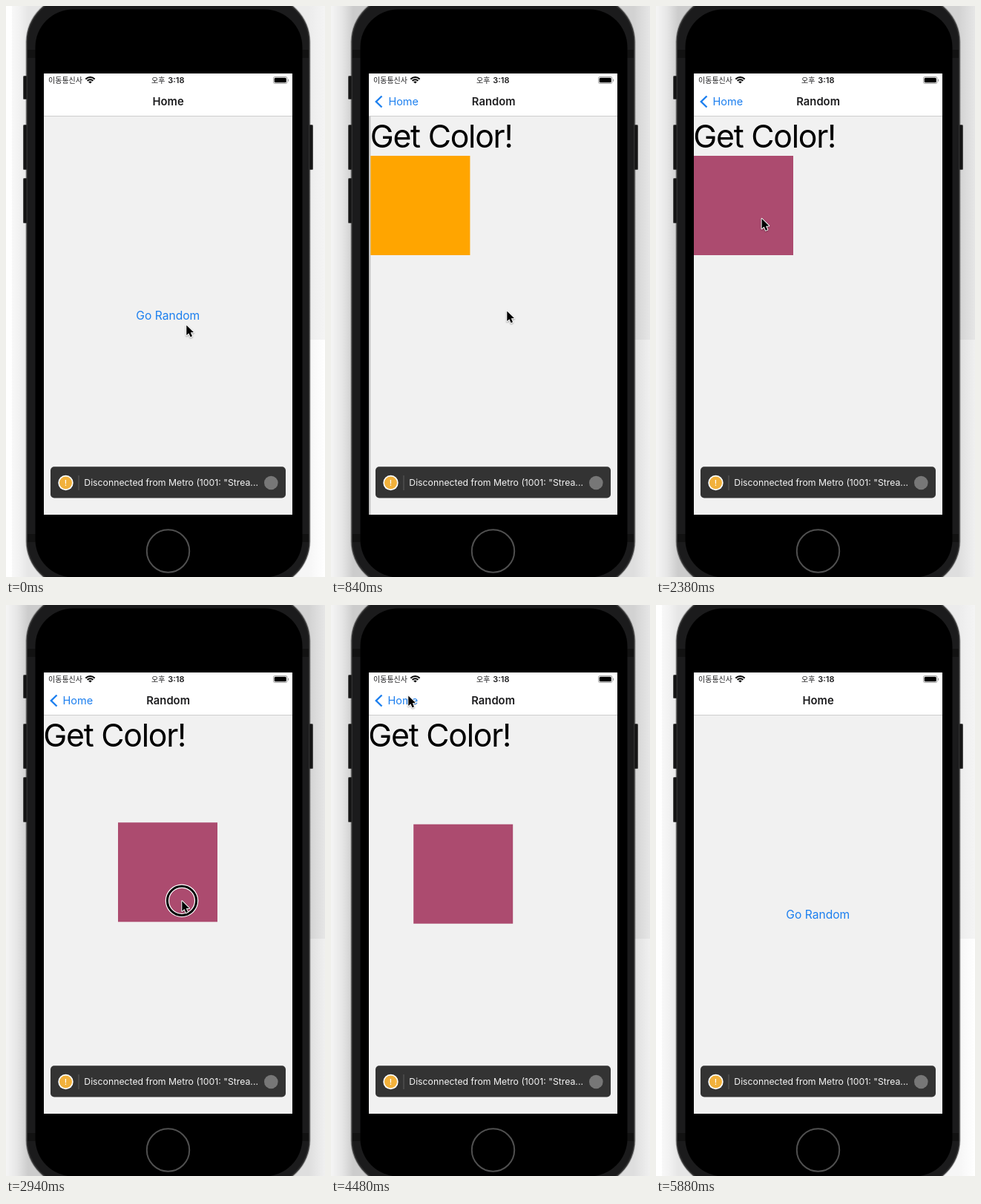
Recreate the animation shown at these times as an HTML page with a canvas. Size 430 by 770 pixels, loop 6.58 s.

```html
<!DOCTYPE html>
<html lang="ko">
<head>
<meta charset="utf-8">
<title>Random color demo</title>
<style>
html, body { margin: 0; width: 100%; height: 100%; overflow: hidden; background: #fff; }
canvas { display: block; width: 430px; height: 770px; }
</style>
</head>
<body>
<canvas id="stage"></canvas>
<script>
const canvas = document.getElementById('stage');
const ctx = canvas.getContext('2d');
const dpr = window.devicePixelRatio || 1;
canvas.width = 430 * dpr;
canvas.height = 770 * dpr;

const LOOP = 6580, STEP = 70;
const SCREEN = { x: 51, y: 91, w: 335, h: 595 };
const BODY = { y: 149, h: 537 };
const BLUE = '#1c7fef', INK = '#1c1c1e', PAGE = '#f1f1f1';
const SANS = 'Inter, "Noto Sans", sans-serif';
const HANGUL = '"Noto Sans CJK KR", "Noto Sans CJK", sans-serif';

const PUSH = 456, POP = 4780;
const TAP = 140;
const OPEN = 350, BACK = 4690;
const boxTaps = [1540, 1750, 2030];
const colors = ['#ffa500', '#f91c94', '#8a63b8', '#ac4b6f'];
const HOLD = { from: 2590, to: 3920 };
const DRAG = { from: 2730, to: 3710, grab: [86, 105.5] };

// Pointer moves: start, end, x, y
const start = [243, 430];
const moves = [
  [0, 350, 237, 411],
  [840, 1470, 187, 157],
  [2100, 2450, 140, 293],
  [3640, 3710, 198, 382],
  [3850, 4480, 104, 122],
  [4830, 5390, 230, 800]
];
// Dragged square: time, x, y
const dragKeys = [
  [2660, 51, 202], [2940, 151, 293.3], [3220, 231, 347],
  [3360, 223.3, 346.2], [3570, 120, 372], [3710, 111.2, 295.7]
];

const clamp = v => Math.max(0, Math.min(1, v));
const mix = (a, b, k) => a + (b - a) * k;
const tapped = (t, at) => t >= at && t < at + TAP;

function pointerAt(t) {
  let pos = start;
  for (const [from, to, ...target] of moves) {
    const k = Math.sin(clamp((t - from) / (to - from)) * Math.PI / 2);
    pos = pos.map((v, i) => mix(v, target[i], k));
  }
  return pos;
}

// Smooth curve through timed points, at rest at both ends
function spline(keys, t) {
  const last = keys.length - 1;
  if (t <= keys[0][0]) return keys[0].slice(1);
  if (t >= keys[last][0]) return keys[last].slice(1);
  const i = keys.findIndex(k => k[0] > t) - 1;
  const span = keys[i + 1][0] - keys[i][0];
  const k = (t - keys[i][0]) / span;
  const slope = (n, axis) => n === 0 || n === last ? 0 :
    (keys[n + 1][axis] - keys[n - 1][axis]) / (keys[n + 1][0] - keys[n - 1][0]);
  return [1, 2].map(axis =>
    mix(keys[i][axis], keys[i + 1][axis], k * k * (3 - 2 * k)) +
    span * k * (1 - k) * ((1 - k) * slope(i, axis) - k * slope(i + 1, axis)));
}

// Critically damped spring, stiffness 1000 and mass 3
function spring(ms) {
  const s = Math.sqrt(1000 / 3) * Math.max(0, ms) / 1000;
  const p = 1 - Math.exp(-s) * (1 + s);
  return p > 0.9995 ? 1 : p;
}

function rect(x, y, w, h, fill) {
  ctx.fillStyle = fill;
  ctx.fillRect(x, y, w, h);
}

function round(x, y, w, h, r, fill) {
  ctx.beginPath();
  ctx.roundRect(x, y, w, h, r);
  ctx.fillStyle = fill;
  ctx.fill();
}

function disc(x, y, r, fill) {
  ctx.beginPath();
  ctx.arc(x, y, r, 0, Math.PI * 2);
  ctx.fillStyle = fill;
  ctx.fill();
}

function circle(x, y, r, width, color) {
  ctx.beginPath();
  ctx.arc(x, y, r, 0, Math.PI * 2);
  ctx.lineWidth = width;
  ctx.strokeStyle = color;
  ctx.stroke();
}

function text(str, x, y, font, fill, align = 'left', spacing = 0) {
  ctx.font = font;
  ctx.fillStyle = fill;
  ctx.textAlign = align;
  ctx.letterSpacing = spacing + 'px';
  ctx.fillText(str, x, y);
}

function faded(alpha, draw) {
  ctx.save();
  ctx.globalAlpha = clamp(alpha);
  draw();
  ctx.restore();
}

function gradient(x0, x1, ...stops) {
  const g = ctx.createLinearGradient(x0, 0, x1, 0);
  stops.forEach((c, i) => g.addColorStop(i / (stops.length - 1), c));
  return g;
}

function drawBackdrop(active) {
  rect(0, 0, 430, 770, '#fff');
  if (active) {
    rect(0, 0, 60, 770, gradient(0, 30, '#f5f5f5', '#e6e6e6', '#cccccc'));
    rect(380, 0, 50, 450, gradient(408, 430, '#d2d2d2', '#e6e6e6'));
    rect(380, 450, 50, 320, gradient(408, 430, '#dedede', '#f0f0f0'));
  } else {
    rect(8, 0, 52, 770, gradient(8, 30, '#f8f8f8', '#f1f1f1', '#e6e6e6'));
    rect(380, 0, 50, 450, gradient(408, 430, '#ececec', '#f4f4f4'));
    rect(380, 450, 50, 320, gradient(408, 430, '#f6f6f6', '#ffffff'));
  }
}

function sideButton(x, y, h) {
  round(x, y, 6, h, 1.5, '#4a4a4a');
  round(x + 1, y + 1, 4, h - 2, 1, '#161616');
}

function drawPhone() {
  sideButton(23, 94, 32);
  sideButton(23, 160, 61);
  sideButton(23, 232, 61);
  sideButton(408, 160, 61);
  round(26.5, -14.5, 384, 799, 63, 'rgba(0,0,0,.3)');
  round(27.5, -13.5, 382, 797, 62, '#303030');
  round(29, -12, 379, 794, 61, '#1b1b1c');
  for (const y of [59, 712]) rect(29, y, 379, 11, '#121212');
  round(39.5, 4.5, 360, 766, 51, '#000');
  circle(218.5, 735, 28.7, 2, '#505050');
}

function drawStatus() {
  text('이동통신사', 57, 104, '10px ' + HANGUL, INK);
  text('오후', 196, 104, '500 10px ' + HANGUL, INK);
  text('3:18', 240.5, 104, '600 11px ' + SANS, INK, 'right');

  ctx.save();
  ctx.beginPath();
  ctx.moveTo(113.5, 104.5);
  ctx.arc(113.5, 104.5, 12, -Math.PI * 0.76, -Math.PI * 0.24);
  ctx.clip();
  circle(113.5, 104.5, 8.4, 2, '#000');
  circle(113.5, 104.5, 5.2, 2, '#000');
  disc(113.5, 104.5, 3, '#000');
  ctx.restore();

  round(360, 95, 19.5, 10, 3, '#a5a5a5');
  round(360.9, 95.9, 17.7, 8.2, 2.2, '#fff');
  round(361.7, 96.7, 16.1, 6.6, 1.5, '#000');
  round(380, 98.4, 1.2, 3.4, 0.6, '#a5a5a5');
}

function drawHeader(p, t) {
  rect(SCREEN.x, SCREEN.y, SCREEN.w, 57, '#fff');
  rect(SCREEN.x, 148, SCREEN.w, 1, '#cdcdcd');
  drawStatus();

  const title = '600 14.8px ' + SANS;
  const middle = 218.6, travel = 122;
  faded(1 - 2 * p, () => text('Home', middle - travel * p, 134, title, INK, 'center'));
  faded(p * p, () => text('Random', middle + SCREEN.w / 4 * (1 - p), 134, title, INK, 'center'));

  faded((p - 0.3) / 0.7 * (tapped(t, BACK) ? 0.3 : 1), () => {
    ctx.lineWidth = 2.4;
    ctx.strokeStyle = BLUE;
    ctx.stroke(new Path2D('M68.5 121.5L60.8 129L68.5 136.5'));
    text('Home', 76.5 + travel * (1 - p), 134, '14.5px ' + SANS, BLUE);
  });
}

function drawHome(p, t) {
  faded(tapped(t, OPEN) ? 0.3 : 1, () =>
    text('Go Random', 218.3 - 0.3 * SCREEN.w * p, 423, '15.6px ' + SANS, BLUE, 'center'));
  rect(SCREEN.x, BODY.y, SCREEN.w, BODY.h, `rgba(0,0,0,${0.07 * p})`);
}

function drawRandom(p, t) {
  const { x, w } = SCREEN;
  ctx.save();
  ctx.translate(w * (1 - p), 0);
  rect(x - 6, BODY.y, 6, BODY.h, gradient(x - 6, x, 'rgba(0,0,0,0)', 'rgba(0,0,0,.18)'));
  rect(x, BODY.y, w, BODY.h, PAGE);
  text('Get Color!', 50.3, 190.8, '42.8px ' + SANS, '#000', 'left', -1.25);
  const changes = boxTaps.filter(at => t >= at + TAP).length;
  rect(...spline(dragKeys, t), 134, 134, colors[changes]);
  ctx.restore();
}

function drawToast() {
  round(60, 621.2, 317, 42.3, 5, '#333');
  disc(80.5, 643, 10.2, '#fff');
  disc(80.5, 643, 8.5, '#f2b13b');
  text('!', 80.5, 647, '500 11px ' + SANS, '#fff', 'center');
  rect(97.5, 633, 1, 20, '#5c5c5c');
  text('Disconnected from Metro (1001: "Strea...', 105.3, 647.3, '12.25px ' + SANS, '#f4f4f4');
  disc(357.3, 643, 9.3, '#777');
}

const arrow = new Path2D('M.3 .5V14L3.4 11.2L5.6 16.3L8 15.3L5.8 10.3L10 10.1Z');

function drawPointer(t) {
  const dragging = t >= DRAG.from && t < DRAG.to;
  const [x, y] = dragging
    ? spline(dragKeys, t).map((v, i) => v + DRAG.grab[i])
    : pointerAt(t);
  const holding = t >= HOLD.from && t < HOLD.to;
  if (holding || [OPEN, ...boxTaps, BACK].some(at => tapped(t, at))) {
    circle(x, y, 19.6, 5.4, '#fff');
    circle(x, y, 19.6, 3, '#000');
  }
  ctx.save();
  ctx.translate(x, y);
  ctx.lineJoin = 'round';
  ctx.lineWidth = 2;
  ctx.strokeStyle = '#fff';
  ctx.shadowColor = 'rgba(0,0,0,.35)';
  ctx.shadowBlur = 2 * dpr;
  ctx.shadowOffsetY = dpr;
  ctx.stroke(arrow);
  ctx.shadowColor = 'transparent';
  ctx.fillStyle = '#000';
  ctx.fill(arrow);
  ctx.restore();
}

function draw(t) {
  const p = t < POP ? spring(t - PUSH) : 1 - spring(t - POP);
  ctx.setTransform(dpr, 0, 0, dpr, 0, 0);
  drawBackdrop(t >= OPEN && t < 5880);
  drawPhone();
  ctx.save();
  ctx.beginPath();
  ctx.rect(SCREEN.x, SCREEN.y, SCREEN.w, SCREEN.h);
  ctx.clip();
  rect(SCREEN.x, SCREEN.y, SCREEN.w, SCREEN.h, PAGE);
  drawHome(p, t);
  if (p > 0) drawRandom(p, t);
  drawHeader(p, t);
  drawToast();
  ctx.restore();
  drawPointer(t);
}

function tick() {
  const t = performance.now() % LOOP;
  draw(Math.floor(t / STEP) * STEP);
  requestAnimationFrame(tick);
}
tick();
</script>
</body>
</html>
```
